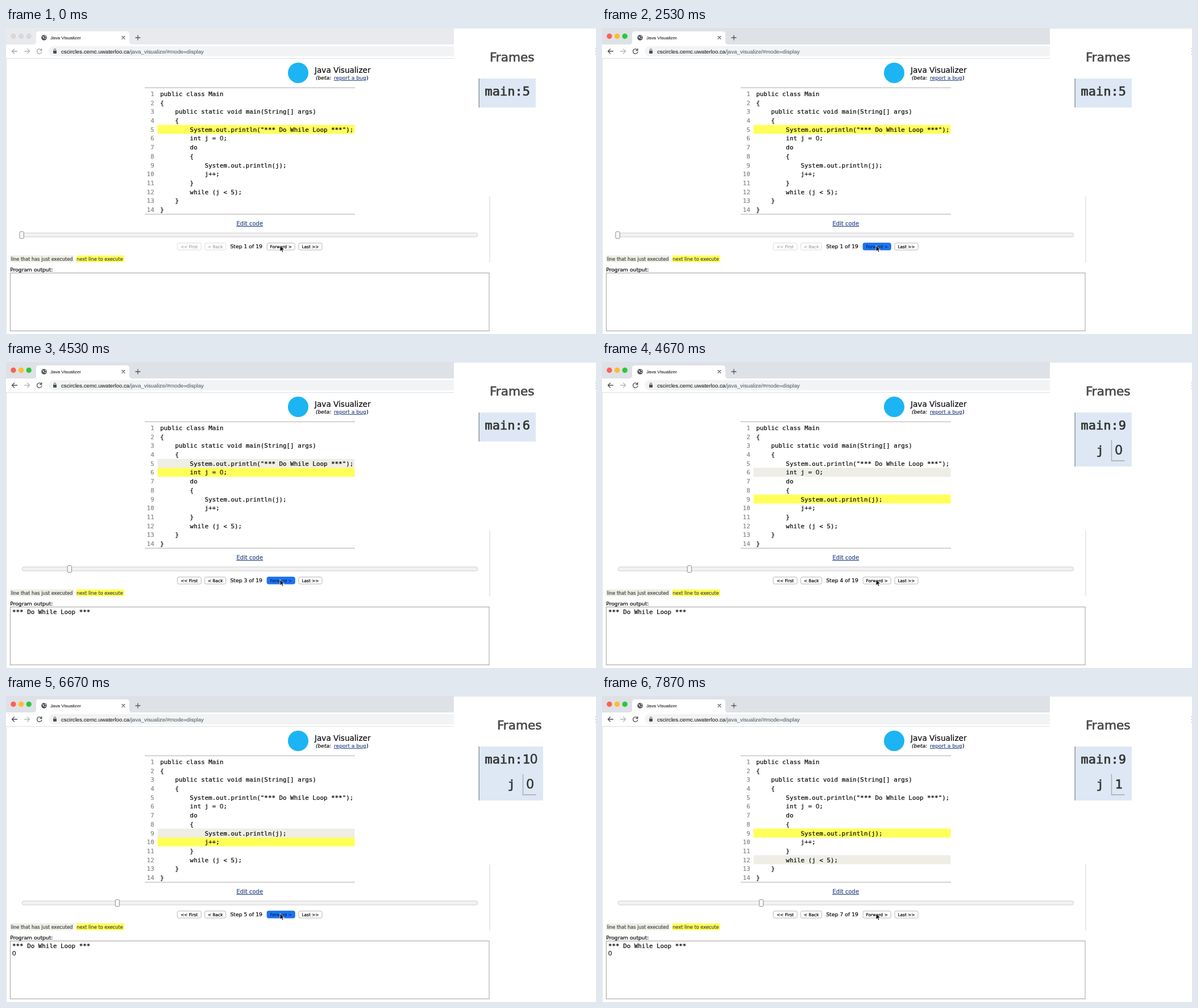
An HTML page that plays this animation: 1038x539 px, repeating every 8 s.

```html
<!DOCTYPE html>
<html lang="en">
<head>
<meta charset="utf-8">
<title>Java Visualizer</title>
<style>
html, body { margin: 0; width: 100%; height: 100%; overflow: hidden; background: #fff; }
svg { display: block; width: 1038px; height: 539px; }
text { white-space: pre; font-family: "DejaVu Sans", Verdana, sans-serif; color: #0a0a0a;
  fill: currentColor; stroke: currentColor; stroke-width: .22; }
.ui { font-family: "Liberation Sans", Arial, sans-serif; color: #222; stroke-width: .1; }
.mono { font: 10.87px "DejaVu Sans Mono", monospace; }
.zero { font: 11.44px "Open Sans", sans-serif; }
.big { font-size: 22px; color: #333; stroke-width: .7; }
.big .zero { font-size: 23.1px; }
.link { color: #2c4a8c; text-decoration: underline; }
.end { text-anchor: end; color: #888; }
.mid { text-anchor: middle; }
.line { fill: none; stroke-linecap: round; stroke-linejoin: round; }
</style>
</head>
<body>
<svg viewBox="0 0 1038 539">
  <g id="chrome"></g>
  <g id="page"></g>
  <g id="panel"></g>
  <path d="M482 383V393.6L484.5 391.4L486.1 395L488 394.2L486.4 390.7H489.7Z" fill="#111" stroke="#fff" stroke-width=".8"/>
</svg>
<script>
const LOOP = 8000;
const code = `public class Main
{
    public static void main(String[] args)
    {
        System.out.println("*** Do While Loop ***");
        int j = 0;
        do
        {
            System.out.println(j);
            j++;
        }
        while (j < 5);
    }
}`.split("\n");

// per step: line just executed, next line, value of j, lines printed
const steps = [
  [0, 5, null, 0], [0, 5, null, 0], [5, 6, null, 1], [6, 9, 0, 1],
  [9, 10, 0, 2], [10, 12, 1, 2], [12, 9, 1, 2]
];
const presses = [2530, 3530, 4530, 5670, 6670, 7730];
const releases = [2670, 3730, 4670, 5800, 6870, 7870];
const output = ["*** Do While Loop ***", "0"];

const $ = id => document.getElementById(id);
const esc = s => String(s).replace(/&/g, "&amp;").replace(/</g, "&lt;").replace(/>/g, "&gt;");
const rect = (x, y, w, h, fill, more = "") =>
  `<rect x="${x}" y="${y}" width="${w}" height="${h}" fill="${fill}" ${more}/>`;
const dot = (x, y, r, fill) => `<circle cx="${x}" cy="${y}" r="${r}" fill="${fill}"/>`;
const path = (d, stroke, width = 1) =>
  `<path class="line" d="${d}" stroke="${stroke}" stroke-width="${width}"/>`;
const text = (x, y, size, s, more = "") =>
  `<text x="${x}" y="${y}" font-size="${size}" ${more}>${esc(s)}</text>`;
// zeros are drawn without the inner dot
const mono = (x, y, s, cls = "") =>
  `<text class="mono ${cls}" x="${x}" y="${y}">${esc(s).replace(/0/g, '<tspan class="zero">0</tspan>')}</text>`;

function drawChrome(active) {
  const ink = active ? "#4a4d51" : "#a4a6a9";
  const lights = active ? ["#fe5f57", "#febc2e", "#28c840"] : Array(3).fill("#d6d8db");
  $("chrome").innerHTML =
    rect(0, 0, 1038, 29, active ? "#dee1e6" : "#e8eaed") +
    lights.map((c, i) => dot(13 + 13.6 * i, 14.5, 4.7, c)).join("") +
    `<path d="M48 29Q53 29 53 24V11Q53 6 58 6H212Q217 6 217 11V24Q217 29 222 29Z" fill="#fff"/>` +
    dot(67, 17, 4.8, "#4a4d51") +
    path("M64.2 15.2L66.5 16L65.6 18M68.5 13.8L70 15.5M68 18.8L70 18", "#fff", 1.1) +
    text(78, 20, 8.05, "Java Visualizer", 'class="ui"') +
    path("M204 14.5L209 19.5M209 14.5L204 19.5", "#555", 1.1) +
    path("M228 17H236M232 13V21", "#555", 1.3) +
    rect(0, 29, 1038, 24, "#fff") + rect(0, 53, 1038, 1, "#dcdee1") +
    path("M19.5 41H10.5M14.5 37L10.5 41L14.5 45", ink, 1.3) +
    path("M32.5 41H41.5M37.5 37L41.5 41L37.5 45", "#b4b6b9", 1.3) +
    path("M62 38.5A4.2 4.2 0 1 0 62.8 42.2M62.8 36.5V39.5H59.8", ink, 1.3) +
    rect(75, 32, 740, 18, "#f1f3f4", 'rx="9"') +
    rect(83, 40, 6, 5, "#4a4d51", 'rx=".8"') + path("M84.3 40V38.6A1.7 1.7 0 0 1 87.7 38.6V40", "#4a4d51") +
    `<text class="ui" x="97" y="44.5" font-size="9.66">cscircles.cemc.uwaterloo.ca<tspan fill="#5f6368" stroke="#5f6368">/java_visualize/#mode=display</tspan></text>`;
}

function button(x, w, label, enabled, pressed) {
  const border = pressed ? "#1a66dc" : enabled ? "#b5b5b5" : "#dcdcdc";
  const ink = pressed ? "#0c2c62" : enabled ? "#0a0a0a" : "#aaa";
  return rect(x, 378.8, w, 12.2, pressed ? "#1b74f2" : "#fff", `rx="2.5" stroke="${border}"`) +
    text(x + w / 2, 387.6, 7.4, label, `class="mid" style="color:${ink}"`);
}

function drawPage(step, pressed) {
  const [last, next, , printed] = steps[step - 1];
  const top = n => 107.9 + 15.7 * (n - 1);
  const mark = (n, fill) => n ? rect(266.5, top(n).toFixed(1), 347, 15.7, fill) : "";
  $("page").innerHTML =
    rect(0, 54, 1, 485, "#dedede") +
    dot(514, 79, 18, "#1cb4f3") +
    text(543, 79, 13.6, "Java Visualizer") +
    text(545, 91, 9.1, "(beta:", 'font-style="italic"') +
    text(577, 91, 9.1, "report a bug", 'class="link"') + text(634, 91, 9.1, ")") +
    rect(244, 104.7, 370, 1, "#aaa") + rect(244, 327.5, 370, 1, "#aaa") +
    mark(last, "#eeeee6") + mark(next, "#ffff59") +
    code.map((s, i) => {
      const y = (top(i + 1) + 12).toFixed(1);
      return `<text class="mono end" x="260.8" y="${y}">${i + 1}</text>` + mono(271.3, y, s);
    }).join("") +
    text(405.5, 348, 9.97, "Edit code", 'class="link"') +
    rect(28.5, 361, 801, 7, "#f2f2f2", 'rx="3" stroke="#cfcfcf"') +
    rect(23.9 + 42.1 * (step - 1), 358.7, 7.4, 12, "#f8f8f8", 'rx="2" stroke="#8c8c8c"') +
    button(301.3, 42, "<< First", step > 1) + button(349.7, 37, "< Back", step > 1) +
    text(394.5, 388, 9.26, `Step ${step} of 19`) +
    button(459.2, 49, "Forward >", true, pressed) + button(515, 41, "Last >>", true) +
    rect(7.5, 400.5, 112, 12, "#eeeee6") + rect(123.5, 400.5, 84.5, 12, "#ffff59") +
    text(8.5, 409.5, 8.2, "line that has just executed", 'style="color:#444"') +
    text(124.3, 409.5, 8.2, "next line to execute", 'style="color:#444"') +
    text(7.3, 428.6, 9.2, "Program output:") +
    rect(7.5, 431.5, 842.5, 102, "#fff", 'stroke="#a0a0a0"') +
    output.slice(0, printed).map((s, i) => mono(11, 444 + 12.6 * i, s)).join("") +
    rect(850.5, 297, 1, 116, "#d4d4d4");
}

function drawPanel(step) {
  const [, next, j] = steps[step - 1];
  const shift = next > 9 ? 13 : 0;
  const height = j === null ? 51 : 95;
  $("panel").innerHTML =
    rect(788, 1, 250, 296, "#fff") +
    [36.5, 41.5, 46.5].map(y => dot(1037.8, y, .7, "#888")).join("") +
    text(851 + shift, 59, 21.6, "Frames", 'style="color:#484848;stroke-width:.7"') +
    rect(832, 89, 100 + shift, height, "#dde8f4") + rect(831.5, 89, 1.5, height, "#8e959e") +
    mono(842.5, 119, "main:" + next, "big") +
    (j === null ? "" :
      mono(869.5 + shift, 163, "j", "big") +
      path(`M${896.5 + shift} 138V174H${919 + shift}`, "#a3a9b0", 1.3) +
      mono(902.4 + shift, 163, j, "big"));
}

let shown = "";
function frame(now) {
  const t = now % LOOP;
  const past = times => times.filter(x => t >= x).length;
  const active = t >= 1470;
  const step = 1 + past(releases);
  const pressed = past(presses) >= step;
  const key = [active, step, pressed].join();
  if (key !== shown) {
    shown = key;
    drawChrome(active);
    drawPage(step, pressed);
    drawPanel(step);
  }
  requestAnimationFrame(frame);
}
frame(performance.now());
</script>
</body>
</html>
```
